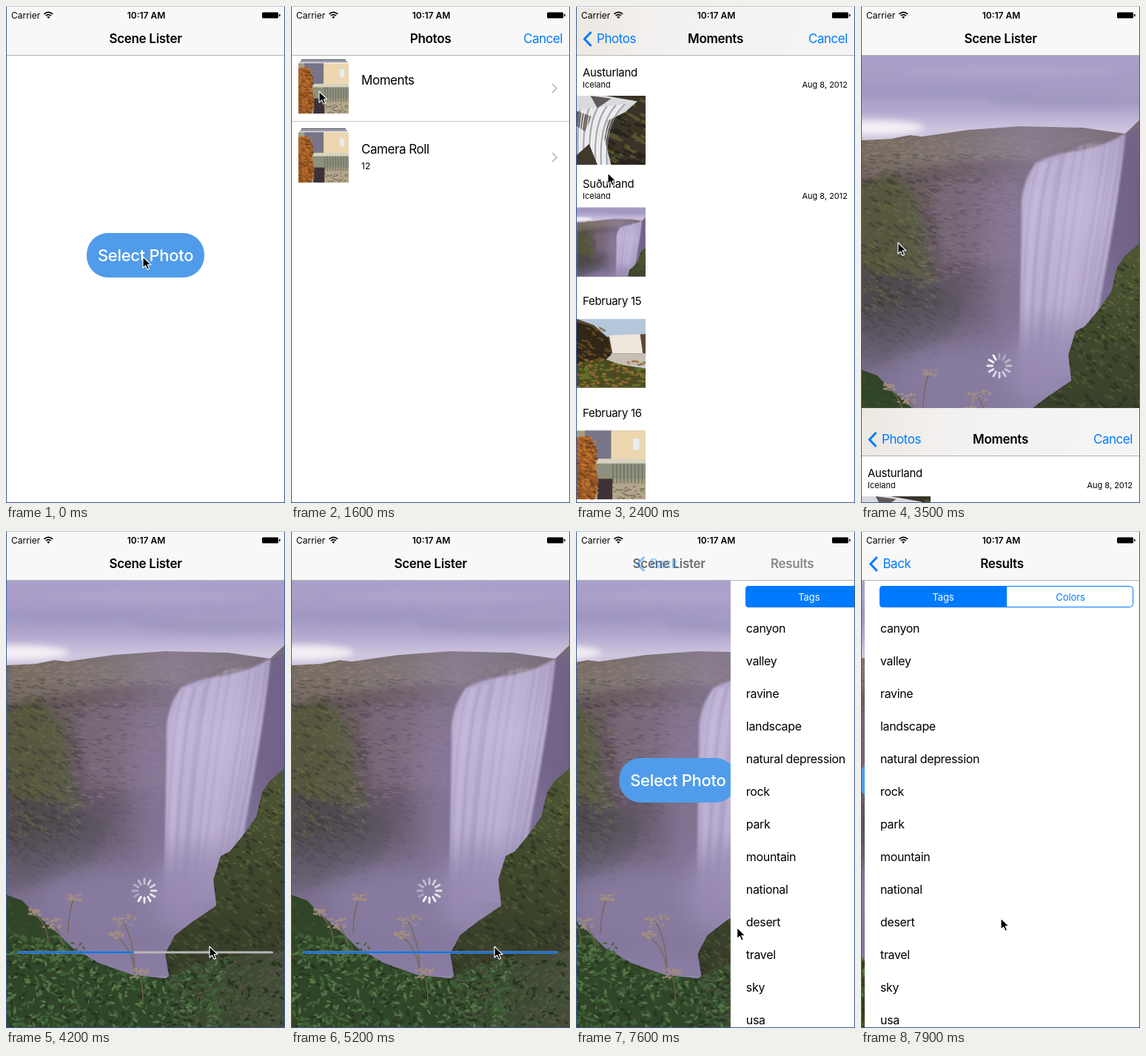
These frames come from a looping animation (377x670 px, 8000 ms). An HTML page:

```html
<!DOCTYPE html>
<html lang="en">
<head>
<meta charset="utf-8">
<title>Photo picker</title>
<style>
html, body { margin: 0; width: 100%; height: 100%; overflow: hidden; background: #fff; }
svg { display: block; overflow: hidden; }
text { font: 17px Inter, "Open Sans", sans-serif; letter-spacing: -.45px; fill: #000; }
.mid { text-anchor: middle; }
.end { text-anchor: end; }
.title { font-weight: 600; letter-spacing: -.3px; }
.row { font-size: 16px; letter-spacing: -.35px; }
.head { font-size: 15px; letter-spacing: -.3px; }
.small { font-size: 11px; letter-spacing: 0; }
.bar { font-size: 12px; letter-spacing: 0; }
.seg { font-size: 13px; letter-spacing: -.1px; }
.blue { fill: #007aff; }
.big { font-size: 22px; font-weight: 500; letter-spacing: -.3px; }
.white { fill: #fff; }
</style>
</head>
<body>
<svg id="stage" width="377" height="670" viewBox="0 0 377 670"></svg>
<script>
const W = 377, H = 670, LOOP = 8000, STEP = 100;
const APP = 'Scene Lister';
const TAGS = ['canyon', 'valley', 'ravine', 'landscape', 'natural depression', 'rock', 'park',
  'mountain', 'national', 'desert', 'travel', 'sky', 'usa'];

let seed = 7;
const rnd = (a, b) => {
  seed = seed * 16807 % 2147483647;
  return a + (b - a) * seed / 2147483647;
};
const mix = (a, b, u) => a + (b - a) * u;
const each = (n, f) => Array.from({ length: n }, (_, i) => f(i)).join('');
const text = (x, y, s, cls = '') => `<text x="${x}" y="${y}" class="${cls}">${s}</text>`;
const rect = (x, y, w, h, fill, more = '') =>
  `<rect x="${x}" y="${y}" width="${w}" height="${h}" fill="${fill}" ${more}/>`;
const shape = (d, fill, more = '') => `<path d="${d}" fill="${fill}" ${more}/>`;
const line = (d, color, width, more = '') =>
  `<path d="${d}" fill="none" stroke="${color}" stroke-width="${width}" ${more}/>`;
const blob = (x, y, rx, ry, fill, more = '') =>
  `<ellipse cx="${x}" cy="${y}" rx="${rx}" ry="${ry}" fill="${fill}" ${more}/>`;
const group = (id, body) => `<g id="${id}">${body}</g>`;
const blurred = (filter, body) => `<g filter="url(#${filter})">${body}</g>`;
const blur = (id, size) => `<filter id="${id}" x="-50%" y="-50%" width="200%" height="200%">` +
  `<feGaussianBlur stdDeviation="${size}"/></filter>`;
const gradient = (id, stops, dir) => `<linearGradient id="${id}" ${dir}>` +
  stops.map(([o, c, a = 1]) => `<stop offset="${o}" stop-color="${c}" stop-opacity="${a}"/>`).join('') +
  '</linearGradient>';

// Scattered strokes and leaves that give rock and grass their texture
const dabs = (n, [x, y, w, h], color, len, width, slope = 0, alpha = .5) =>
  line(each(n, () => {
    const l = rnd(len / 3, len);
    return `M${rnd(x, x + w).toFixed(1)} ${rnd(y, y + h).toFixed(1)}l${l.toFixed(1)} ${(l * slope + rnd(-1.5, 1.5)).toFixed(1)}`;
  }), color, width, `stroke-linecap="round" opacity="${alpha}"`);
const leaves = (n, [x, y, w, h], color, size) =>
  shape(each(n, () => {
    const a = rnd(-.9, 4), l = rnd(size / 2, size), c = l * Math.cos(a), s = l * Math.sin(a);
    const f = v => v.toFixed(1);
    return `M${f(rnd(x, x + w))} ${f(rnd(y, y + h))}q${f(c / 2 - s * .4)} ${f(s / 2 + c * .4)} ${f(c)} ${f(s)}` +
      `q${f(-c / 2 + s * .4)} ${f(-s / 2 - c * .4)} ${f(-c)} ${f(-s)}`;
  }), color);
const patch = (id, d, fill, detail) =>
  `<clipPath id="${id}"><path d="${d}"/></clipPath><g clip-path="url(#${id})">${shape(d, fill)}${detail}</g>`;
const stalk = (x, y, dx, dy, r) =>
  line(`M${x} ${y}q${dx} ${dy * .4} ${dx} ${dy}`, '#75664f', 1.3) +
  dabs(22, [x - r, y - r * .6, r * 2, r * 1.1], '#a58f80', 3, 2.2, 0, .9);

const waterfall = () => blurred('haze',
  shape('M237 211Q262 198 296 195Q330 188 357 172Q350 250 328 370L306 500H214L217 262Q220 232 237 211Z', 'url(#water)') +
  each(46, i => {
    const u = i / 45, x = mix(238, 356, u), y = mix(211, 174, u) + 5 * Math.sin(u * 9);
    return line(`M${x} ${y}Q${mix(217, 347, u)} ${mix(255, 265, u)} ${mix(215, 300, u)} 490`,
      rnd(0, 1) < .65 ? '#d9cfe9' : '#9184ad', rnd(1.5, 4), `opacity="${rnd(.08, .35)}"`);
  }));

const falls = () =>
  rect(0, 67, W, 604, 'url(#sky)') +
  blurred('soft', blob(90, 118, 150, 9, '#9790bb', 'opacity=".4"') + blob(290, 128, 120, 9, '#9189b4', 'opacity=".4"') +
    blob(200, 88, 150, 7, '#b6acd1', 'opacity=".5"') + blob(15, 164, 70, 10, '#f4f0f5')) +
  patch('cliff', 'M0 181L40 179L66 174L82 176L145 167L215 162L300 164L357 172L377 153V600H0Z', 'url(#rock)',
    blurred('soft',
      shape('M0 184L150 169L260 164L357 174L240 208L180 206L100 216L0 232Z', '#776d62') +
      shape('M0 240L45 225L75 260L90 330L105 370L60 400L0 400Z', '#525538') +
      shape('M95 240L215 228L216 345L110 345Z', '#6f5e68') +
      shape('M0 355L90 370L140 390L120 450L0 490Z', '#4b4648') +
      shape('M357 176L377 160V350L320 420Z', '#67597c')) +
    blurred('fine',
      dabs(220, [0, 178, 330, 30], '#91866f', 8, 2, -.06, .5) +
      dabs(130, [0, 200, 220, 40], '#4f463f', 10, 2, .1, .5) +
      dabs(200, [0, 240, 100, 170], '#687040', 5, 2.4, .6, .5) +
      dabs(170, [0, 225, 100, 250], '#35352f', 8, 3, .5, .5) +
      dabs(190, [80, 232, 135, 165], '#4a3c47', 10, 2, .12, .5) +
      dabs(150, [80, 232, 135, 140], '#8c7680', 9, 1.8, .1, .45) +
      dabs(90, [0, 350, 170, 110], '#3d3843', 9, 3, .3, .4)) +
    rect(0, 160, W, 340, 'url(#veil)')) +
  blurred('fog', blob(200, 350, 30, 110, '#8d7fa4', 'opacity=".5"') + blob(325, 410, 25, 80, '#84779f', 'opacity=".6"')) +
  waterfall() +
  rect(0, 400, W, 200, 'url(#mist)') +
  blurred('fog', blob(155, 500, 110, 48, '#8a7da3', 'opacity=".8"') + blob(255, 490, 55, 60, '#9b8eb6', 'opacity=".75"')) +
  patch('hill', 'M377 319L356 337L346 352L338 385L322 408L302 432L290 438L280 470L284 505L250 528L228 545L215 570L220 600H377Z', 'url(#moss)',
    blurred('fine',
      dabs(260, [215, 320, 162, 280], '#58623a', 5, 3, .7, .5) +
      dabs(230, [215, 330, 162, 270], '#25291c', 6, 3.2, .6, .5) +
      dabs(110, [290, 320, 87, 130], '#6c763f', 4, 2.2, .5, .6))) +
  patch('bank', 'M0 490L22 498L38 515L62 535L90 562L125 582L170 598L215 603L240 588L300 574L377 565V671H0Z', 'url(#grass)',
    blurred('fine',
      dabs(90, [0, 490, 110, 90], '#3f4b30', 6, 4, .5, .7) +
      dabs(140, [215, 560, 162, 110], '#5f5650', 6, 3, -.5, .6) +
      leaves(330, [0, 545, 300, 125], '#3e5f37', 13) +
      leaves(260, [0, 555, 377, 115], '#25361f', 11) +
      leaves(260, [0, 550, 300, 120], '#547646', 10) +
      leaves(130, [220, 585, 157, 85], '#45593a', 10))) +
  leaves(40, [10, 545, 95, 30], '#48653a', 11) +
  stalk(92, 495, -8, 48, 9) + stalk(37, 515, 20, 40, 9) + stalk(62, 530, 15, 35, 13) +
  stalk(158, 526, 16, 70, 16) + stalk(148, 545, 25, 50, 9) + stalk(180, 596, 5, 40, 12);

// Thumbnails share a 100-unit square
const rapids = () => rect(0, 0, 100, 100, '#3a3327') +
  dabs(50, [30, 0, 70, 100], '#626332', 9, 4, .4, .7) + dabs(35, [40, 20, 60, 80], '#211d18', 12, 4, .5, .7) +
  shape('M0 0H42L88 8L70 24L45 36L40 62L50 100H0Z', '#dadade') +
  shape('M0 22L22 30L12 52L0 44Z', '#5d5650') + shape('M20 0L50 4L30 18Z', '#62595a') +
  each(16, i => line(`M${mix(5, 70, i / 15)} ${mix(20, 12, i / 15)}Q${mix(0, 40, i / 15)} 40 ${mix(2, 44, i / 15)} 100`,
    i % 3 ? '#fff' : '#8f919c', 2, 'opacity=".7"')) +
  shape('M0 86L18 70L30 100H0Z', '#41382c');

const shore = () => rect(0, 0, 100, 100, '#c9cfd8') + rect(0, 0, 100, 28, '#b4c7db') +
  shape('M0 0L25 9L44 26L60 24L100 22V55H0Z', '#5b4930') + shape('M47 24L92 22L96 50H52Z', '#efe6dc') +
  shape('M42 50H100V68H36Z', '#c8bfb4') + shape('M0 5L20 10L46 28L50 52L30 70L0 72Z', '#302718') +
  shape('M0 65L36 56L62 66L100 72V100H0Z', '#4b4b22') +
  dabs(55, [0, 62, 100, 38], '#6f782e', 6, 3, .2, .8) + dabs(45, [0, 58, 100, 42], '#a36a35', 4, 3, 0, .8) +
  dabs(30, [0, 10, 44, 50], '#775124', 6, 2.5, .5, .7);

const house = () => rect(0, 0, 100, 100, '#a69c80') + rect(12, 0, 40, 44, '#777589') +
  rect(50, 0, 50, 43, '#ecd7b1') + rect(82, 12, 9, 16, '#e8edf0') + rect(20, 41, 80, 7, '#d8d2be') +
  rect(28, 48, 72, 22, '#8d907c') + each(9, i => rect(52 + i * 5.3, 48, 1.5, 28, '#6d7065')) +
  rect(30, 70, 22, 30, '#3d3238') + rect(52, 78, 48, 22, '#b4a68c') +
  shape('M0 10L18 8L30 30L26 48L32 74L26 100H0Z', '#9a5926') +
  dabs(80, [0, 8, 28, 92], '#c7792f', 4, 2.6, .4, .8) + dabs(45, [0, 14, 28, 86], '#623719', 4, 2.4, .3, .7) +
  dabs(30, [52, 82, 48, 18], '#6c6750', 4, 2, 0, .7);

const thumb = (id, x, y, size, box = '0 0 100 100') =>
  `<svg x="${x}" y="${y}" width="${size}" height="${size}" viewBox="${box}"><use href="#${id}"/></svg>`;

const navBar = (fill, top = 0) => rect(0, top, W, 66 - top, fill) + rect(0, 66, W, 1, '#b4b4b6');
const backTo = label => line('M20.500 35L11.500 44.500L20.500 54', '#007aff', 3) + text(28, 50, label, 'blue');

const album = (y, name, count) =>
  rect(14, y + 5, 60, 1.5, '#41424c') + rect(12, y + 7.5, 64, 1.5, '#77759a') + thumb('house', 10, y + 10, 68) +
  text(95, y + 39, name) + text(95, y + 60, count, 'bar') +
  line(`M353 ${y + 38}l6 6l-6 6`, '#c3c3c8', 2);

const moment = (i, name, photo, place) => {
  const y = 150.4 * i;
  return text(9, y + (place ? 94.7 : 102.5), name, 'head') +
    (place ? text(9, y + 110, place, 'small') + text(367, y + 110, 'Aug 8, 2012', 'small end') : '') +
    thumb(photo, 1, y + 121, 93, photo === 'falls' ? '0 100 377 377' : undefined);
};

const spinner = each(12, i =>
  `<rect class="spoke" x="185.600" y="467.500" width="2.800" height="9.500" rx="1.400" fill="#fff" transform="rotate(${i * 30} 187 485)"/>`);

const down = 'x1="0" y1="0" x2="0" y2="1"';
stage.innerHTML = '<defs>' +
  gradient('sky', [[0, '#aaa0ca'], [.07, '#a59bc5'], [.12, '#b1a7ce'], [.165, '#cdc4de'], [1, '#8a7da3']], down) +
  gradient('rock', [[0, '#787060'], [.12, '#655755'], [.5, '#584b54'], [1, '#6d6180']], down) +
  gradient('water', [[0, '#aea2c8'], [.3, '#bbafd3'], [1, '#a598c0']], down) +
  gradient('mist', [[0, '#897da2', 0], [.5, '#897da2', .65], [1, '#8b7fa6', .95]], down) +
  gradient('veil', [[.1, '#9587ad', .05], [.35, '#9587ad', .25], [.6, '#9587ad', .6], [1, '#8275a0', .35]], '') +
  gradient('moss', [[0, '#4e5735'], [.5, '#3f472c'], [1, '#363c29']], down) +
  gradient('grass', [[0, '#304427'], [.55, '#324629'], [1, '#454c38']], '') +
  gradient('tint', [[0, '#ece8e2'], [.3, '#f3f1f0'], [1, '#f5f5f5']], '') +
  blur('fine', .7) + blur('haze', 1.6) + blur('soft', 5) + blur('fog', 16) +
  group('falls', falls()) + group('rapids', rapids()) + group('shore', shore()) + group('house', house()) +
  '</defs>' + rect(0, 0, W, H, '#fff') +

  group('home',
    '<use id="photo" href="#falls"/>' +
    group('button', rect(109, 306, 159, 60, '#509cea', 'rx="29"') + text(188.5, 343.5, 'Select Photo', 'big white mid')) +
    group('busy', spinner + rect(16, 566.5, 345, 3, '#b7b7b7', 'rx="1.500"') +
      rect(16, 566.5, 345, 3, '#1a72dc', 'rx="1.500" id="progress"'))) +
  group('results', rect(1, 66, W, 604, '#fff') +
    rect(21.5, 74.5, 342, 28, '#fff', 'rx="4" stroke="#007aff"') +
    shape('M193 74H25.500a4 4 0 0 0-4 4V99a4 4 0 0 0 4 4H193Z', '#007aff') +
    text(107, 93.5, 'Tags', 'seg white mid') + text(279, 93.5, 'Colors', 'seg blue mid') +
    TAGS.map((tag, i) => text(22, 137 + 44 * i, tag, 'row')).join('')) +
  navBar('#f8f8f8') + group('homeTitle', text(188.5, 50, APP, 'title mid')) +
  group('resultsTitle', text(188.5, 50, 'Results', 'title mid')) + group('homeBack', backTo('Back')) +

  group('sheet', rect(0, 2, W, H, '#fff') +
    group('albums', album(67, 'Moments', '') + rect(0, 155, W, 1, '#c8c7cc') + album(160, 'Camera Roll', '12')) +
    group('moments', rect(0, 66, W, 604, '#fff') +
      moment(0, 'Austurland', 'rapids', 'Iceland') + moment(1, 'Suðurland', 'falls', 'Iceland') +
      moment(2, 'February 15', 'shore') + moment(3, 'February 16', 'house') +
      rect(1, 271.4, 93, 93, '#fff', 'id="pressed" opacity=".3"')) +
    navBar('#f8f8f8', 2) + group('tinted', navBar('url(#tint)', 2)) +
    group('albumsTitle', text(188.5, 50, 'Photos', 'title mid')) +
    group('momentsTitle', text(188.5, 50, 'Moments', 'title mid')) +
    group('albumsBack', backTo('Photos')) + text(367, 50, 'Cancel', 'blue end')) +

  text(7, 16.7, 'Carrier', 'bar') + text(189.5, 16.7, '10:17 AM', 'bar title mid') +
  line('M51.500 10.800Q57.300 5.800 63.200 10.800M53.800 13.200Q57.300 10.200 60.900 13.200', '#000', 1.7) +
  shape('M57.300 17L55.300 14.800Q57.300 13.200 59.300 14.800Z', '#000') +
  rect(346, 8.5, 22, 8, '#000', 'rx="1.500"') + rect(369, 11, 1.5, 3, '#000') +
  rect(.5, -1, 376, 670.5, 'none', 'stroke="#3d5c94"') + rect(0, 0, W, 1, '#c2c6cc') +
  group('cursor', shape('M0 0V15L3.500 11.800L6 17.300L8.600 16.200L6.200 10.800H11Z', '#000',
    'stroke="#fff" stroke-width="1.100" stroke-linejoin="round"'));

const $ = id => document.getElementById(id);
const spokes = [...document.querySelectorAll('.spoke')];
const progressBetween = (t, start, length) => Math.min(1, Math.max(0, (t - start) / length));
const easeOut = p => 1 - (1 - p) ** 3;
const move = (id, x, y = 0) => $(id).setAttribute('transform', `translate(${x} ${y})`);
const fade = (id, a) => $(id).setAttribute('opacity', a);
const show = (id, on) => $(id).setAttribute('display', on ? 'inline' : 'none');

// Navigation push: the new page comes in from the right over the old one
function push(p, from, to) {
  move(from, -.3 * W * p);
  move(to, W * (1 - p));
  show(to, p > 0);
  move(from + 'Title', -140 * p);
  fade(from + 'Title', 1 - p);
  move(to + 'Title', 188 * (1 - p));
  fade(to + 'Title', p);
  move(from + 'Back', 130 * (1 - p));
  fade(from + 'Back', p);
}

const PATH = [[0, 185, 338], [900, 185, 338], [1400, 64, 128], [1500, 46, 120], [1600, 38, 115], [2100, 38, 115],
  [2400, 43, 225], [2600, 74, 335], [2700, 50, 319], [3600, 50, 319], [4200, 275, 560], [7000, 275, 560],
  [7900, 189, 522], [LOOP, 189, 522]];

function pointer(t) {
  const i = PATH.findIndex(k => k[0] > t), [t0, x0, y0] = PATH[i - 1], [t1, x1, y1] = PATH[i];
  const u = (t - t0) / (t1 - t0);
  move('cursor', mix(x0, x1, u), mix(y0, y1, u));
}

function draw(t) {
  const picked = t >= 3400, done = t >= 7500;
  show('photo', picked);
  show('button', !picked || done);
  fade('button', t >= 300 && t < 600 ? .6 : 1);
  show('busy', picked && !done);
  $('progress').setAttribute('width', 345 * progressBetween(t, 3700, 1100));

  const rise = easeOut(progressBetween(t, 550, 500)), drop = easeOut(progressBetween(t, 3300, 475));
  move('sheet', 0, H * (1 - rise + drop));
  const deeper = easeOut(progressBetween(t, 1750, 500));
  push(deeper, 'albums', 'moments');
  fade('tinted', deeper);
  show('pressed', t >= 3000 && t < 3400);
  push(easeOut(progressBetween(t, 7510, 500)), 'home', 'results');

  const lead = Math.round(12 * t / 1000 + 4.6);
  spokes.forEach((s, i) => s.setAttribute('opacity', 1 - .065 * ((lead - i + 120) % 12)));
  pointer(t);
}

const origin = performance.now();
let last = -1;
function tick(now) {
  const t = Math.floor(Math.max(0, now - origin) % LOOP / STEP) * STEP;
  if (t !== last) draw(last = t);
  requestAnimationFrame(tick);
}
draw(0);
requestAnimationFrame(tick);
</script>
</body>
</html>
```
